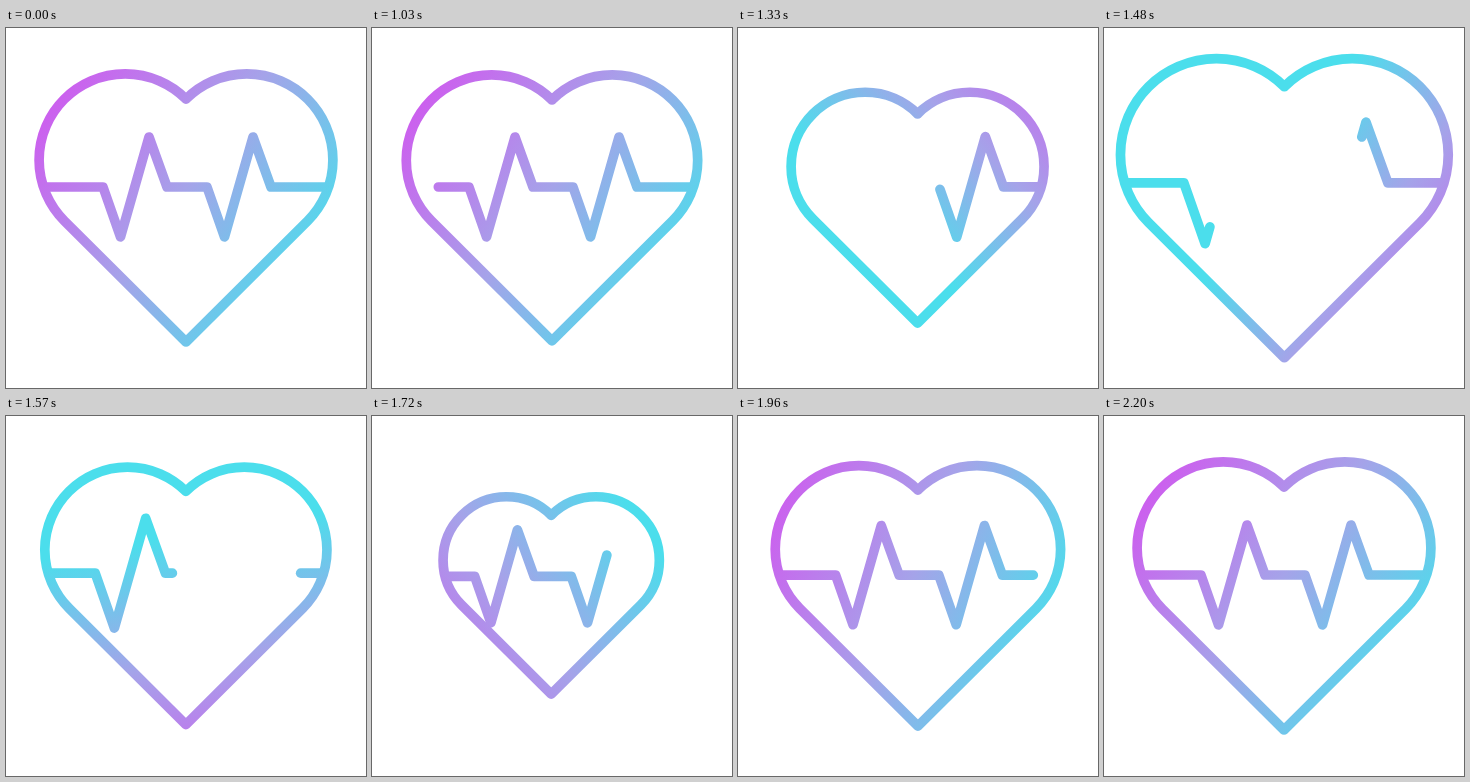
Recreate the animation shown at these times as an HTML page with a canvas. Size 360 by 360 pixels, loop 2.23 s.

```html
<!DOCTYPE html>
<html lang="en">
<head>
<meta charset="utf-8">
<title>Heartbeat</title>
<style>
  html, body { margin: 0; height: 100%; overflow: hidden; background: #fff; }
  canvas { display: block; width: 360px; height: 360px; }
</style>
</head>
<body>
<canvas id="stage" width="360" height="360"></canvas>
<script>
const ctx = document.getElementById('stage').getContext('2d');
const LOOP = 2230, REST = 1030, STEP = 30;
const BEGIN = 1000, SQUEEZE = 1270, SWELL = 1430, SHRINK = 1730, END = 2200;
const CX = 177, CY = 178, BASE = 159;

const mix = (a, b, k) => a + (b - a) * k;
const progress = (t, from, to) => Math.min(1, Math.max(0, (t - from) / (to - from)));
const swing = x => (1 - Math.cos(Math.PI * x)) / 2;
const easeOut = (x, power) => 1 - (1 - x) ** power;
const settle = (x, power) => swing(easeOut(x, power));

// Two identical spikes on a flat line.
const spike = x => [[x, BASE], [x + 17.5, BASE + 50], [x + 46, BASE - 50], [x + 64, BASE]];
const beat = [[38, BASE], ...spike(97), ...spike(201), [322, BASE]];
const beatLength = beat.slice(1).reduce(
  (sum, [x, y], i) => sum + Math.hypot(x - beat[i][0], y - beat[i][1]), 0);

// From rest (1) up to a high, down to a low, then a long settle back to rest.
function swell(t, rise, from, high, low) {
  if (t < SWELL) return mix(from, high, swing(progress(t, rise, SWELL)));
  if (t < SHRINK) return mix(high, low, swing(progress(t, SWELL, SHRINK)));
  return mix(low, 1, settle(progress(t, SHRINK, END), 2.3));
}

const heartScale = t => t < SQUEEZE
  ? mix(1, .735, swing(progress(t, BEGIN, SQUEEZE)))
  : swell(t, SQUEEZE, .735, 1.143, .735);
const beatScale = t => swell(t, 1320, 1, 1.235, .928);

const tail = t => progress(t, BEGIN, 1610);
const head = t => easeOut(progress(t, 1420, 2420), 4);

// Only the points are scaled, so the line weight stays constant.
function trace(scale, build) {
  ctx.save();
  ctx.translate(CX, CY);
  ctx.scale(scale, scale);
  ctx.translate(-CX, -CY);
  ctx.beginPath();
  build();
  ctx.restore();
}

function heart() {
  const q = Math.PI / 4, r = 86.1;
  ctx.arc(119.2, 132, r, -q, 3 * q, true);
  ctx.lineTo(180, 314);
  ctx.arc(240.8, 132, r, q, 5 * q, true);
  ctx.closePath();
}

const pulse = () => beat.forEach(p => ctx.lineTo(...p));

// The gradient makes one turn, sliding towards its violet end on the way.
function gradient(t) {
  const turn = settle(progress(t, BEGIN, END), 1.35);
  const bump = Math.sin(Math.PI * turn ** .75) ** 2;
  const a = (215 + 360 * turn) * Math.PI / 180;
  const middle = 12 + 85 * bump, half = 153 - 40 * bump;
  const at = d => [180 + Math.cos(a) * d, 180 + Math.sin(a) * d];
  const g = ctx.createLinearGradient(...at(middle - half), ...at(middle + half));
  g.addColorStop(0, 'rgb(75,222,236)');
  g.addColorStop(.5, 'rgb(165,163,233)');
  g.addColorStop(1, 'rgb(203,97,238)');
  return g;
}

function strokePart(from, to, length) {
  if (to <= from) return;
  ctx.setLineDash([(to - from) * length, 2 * length]);
  ctx.lineDashOffset = -from * length;
  ctx.stroke();
}

function draw(t) {
  const size = heartScale(t), beatSize = beatScale(t), length = beatLength * beatSize;
  ctx.fillStyle = '#fff';
  ctx.fillRect(0, 0, 360, 360);
  ctx.strokeStyle = gradient(t);
  ctx.lineWidth = 9.7;
  ctx.lineCap = ctx.lineJoin = 'round';

  ctx.save();
  trace(size, heart);
  ctx.clip();
  trace(beatSize, pulse);
  strokePart(0, head(t), length);
  strokePart(tail(t), 1, length);
  ctx.restore();

  trace(size, heart);
  ctx.stroke();
}

const start = performance.now();
function tick() {
  const t = (performance.now() - start) % LOOP;
  draw(t < REST ? 0 : REST + Math.floor((t - REST) / STEP) * STEP);
  requestAnimationFrame(tick);
}
tick();
</script>
</body>
</html>
```
